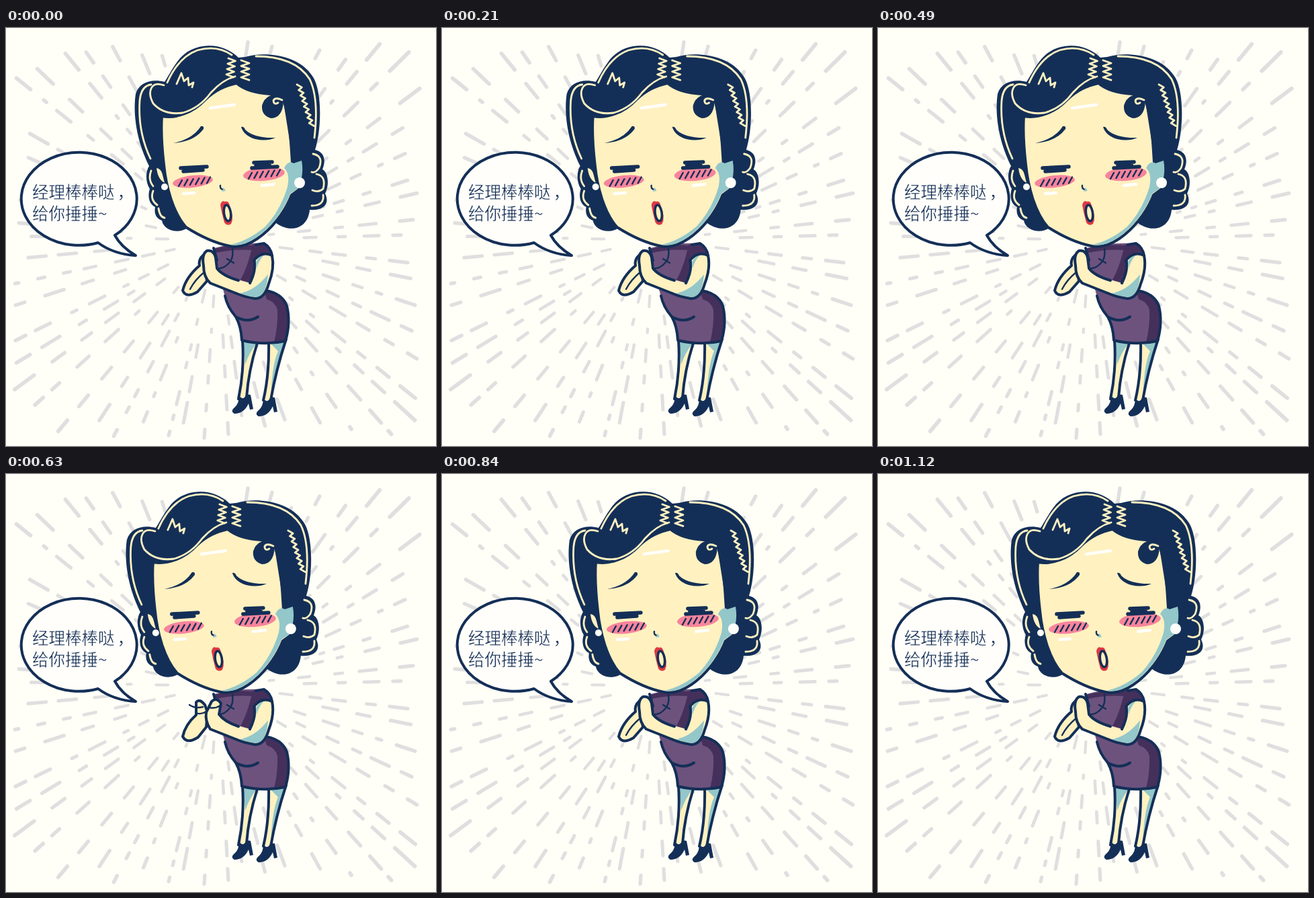
Write an HTML page that moves like this. It is 640 by 621 pixels and loops after 1.19 s.

```html
<!DOCTYPE html>
<html lang="zh">
<head>
<meta charset="utf-8">
<style>
html, body { margin: 0; width: 100%; height: 100%; overflow: hidden; background: #fffef7; }
svg { display: block; width: 640px; height: 621px; stroke-linecap: round; stroke-linejoin: round; }
.ink { fill: none; stroke: #142f57; stroke-width: 4; }
.thin { stroke-width: 2.4; }
.line { stroke: #142f57; stroke-width: 4; }
.navy { fill: #142f57; }
.skin { fill: #fff1c0; }
.shade { fill: #93c7ca; }
.dark { fill: #45305c; }
.light { fill: none; stroke: #fff1c0; stroke-width: 2.8; }
.white { fill: none; stroke: #fffefa; stroke-width: 4.5; }
text { font: 300 24.5px "Noto Sans CJK SC", "Noto Sans CJK", sans-serif; fill: #142f57; stroke: #fffefa; stroke-width: .4; }
</style>
</head>
<body>
<svg viewBox="0 0 640 621">
  <g id="rays" fill="none" stroke="#e0dfe0"></g>

  <path class="line" fill="#fffefa" d="M162 308A86 69 0 1 0 137 319Q160 336 193 338Q171 325 162 308Z"/>
  <text x="39" y="253">经理棒棒哒<tspan dx="4">，</tspan></text>
  <text x="39" y="285">给你捶捶~</text>

  <g id="legs">
    <path class="skin" d="M352 465Q355 505 347 549L358 549Q361 508 375 465ZM391 466Q393 510 383 553L394 553Q401 510 417 462Z"/>
    <path class="shade" d="M353 465L374 467Q362 482 356 500ZM392 467L416 464Q402 508 394 550Q396 500 405 480Z"/>
    <path class="ink" d="M352 464Q355 508 346 551M374 468Q361 508 358 549M391 467Q392 515 383 553M417 462Q402 507 394 553"/>
    <path id="shoe" class="navy" d="M347 546Q353 555 358 544L364 545L368 566L363 567L361 558Q354 573 340 573Q333 569 341 563Q347 557 347 546Z"/>
    <use href="#shoe" x="36" y="4"/>
  </g>
  <g id="dress">
    <path fill="#6d527e" d="M310 327Q340 318 384 320Q394 326 396 338L374 375L384 390Q411 394 418 413Q424 437 416 465Q385 472 351 464Q350 443 342 429Q329 414 326 398L320 378Z"/>
    <path class="dark" d="M367 322L386 320L396 338L363 379L349 374Q360 355 367 322ZM384 390Q411 394 418 413Q424 437 416 465L399 467Q405 443 404 419Q401 407 388 403ZM311 328Q338 320 368 323V330Q338 328 313 334Z"/>
    <path class="ink" d="M326 398Q329 414 342 429Q350 443 351 464Q385 472 416 465Q424 437 418 413Q411 394 386 390M342 429Q360 439 375 429M309 327L314 345M372 322L384 320Q394 326 396 338"/>
    <path class="ink thin" d="M337 328Q339 342 332 349Q324 358 315 357M329 343L339 349"/>
  </g>
  <g id="arm">
    <path class="skin" d="M372 343Q382 331 396 338Q400 357 391 380Q385 402 371 402Q356 400 342 394L325 378L345 374L364 379Q372 362 372 343Z"/>
    <path class="shade" d="M347 394Q370 391 390 366Q388 396 374 400Q359 399 347 394ZM372 348Q375 340 384 337Q375 347 373 358Z"/>
    <path class="ink" d="M371 343Q382 331 396 338Q400 357 391 380Q385 402 371 402Q356 400 342 394M369 345Q373 359 363 379"/>
  </g>
  <g id="closed">
    <path class="skin line" d="M294 337Q286 344 288 353Q268 370 263 390Q268 402 285 392L299 376Z"/>
    <path class="ink thin" d="M296 362Q281 374 274 388"/>
    <path class="skin line" d="M342 394L304 379Q294 370 294 353Q291 336 299 331Q309 329 312 341L314 357Q322 368 346 375"/>
  </g>
  <g id="open">
    <path class="skin line" d="M283 339Q288 333 296 343L300 354L298 376L286 391Q269 402 263 390Q267 372 283 358Z"/>
    <path class="skin line" d="M342 394L304 379Q296 367 298 354L306 338Q314 331 320 341L317 357Q325 368 346 375"/>
    <path class="ink thin" d="M273 343Q282 349 293 346M283 355Q290 358 298 353M303 347Q311 349 319 344"/>
  </g>
  <path class="skin" d="M336 377L352 379L352 394L336 388Z"/>

  <g id="head">
    <path class="navy" d="M346 44C320 18 275 21 255 50C246 62 241 73 236 80C218 75 198 80 193 98C189 125 193 165 213 205C207 215 208 230 214 239C210 252 214 262 222 266C220 276 224 283 232 286C235 302 258 306 270 297L400 288C418 304 449 302 452 270C471 272 483 262 475 246C482 232 479 214 471 210C477 195 473 184 460 181C470 150 471 90 455 70C435 40 385 34 356 43Z"/>
    <path class="skin line" d="M232 131C253 135 278 126 297 106C312 92 326 86 343 82C355 92 374 97 393 98L413 106C423 138 424 168 426 200L440 196Q446 218 436 240L425 248C415 274 395 299 374 313Q352 328 333 324C308 319 287 308 268 296C248 274 238 234 235 203Q230 160 232 131Z"/>
    <path class="shade" d="M414 208Q420 196 428 201L440 197Q444 219 435 238L423 246C413 272 394 297 373 311Q353 325 334 322Q361 316 386 295Q409 270 419 236Q423 216 414 208Z"/>
    <path class="navy" d="M392 101Q405 95 421 110L427 198L413 110Q411 134 394 134Q380 130 381 115Q384 105 392 101Z"/>
    <path class="light" d="M411 107Q400 102 398 108Q399 115 405 111"/>

    <g class="light">
      <path d="M235 85Q220 80 216 90Q212 99 219 112Q235 130 263 126Q288 119 305 96Q322 77 341 72M216 84Q201 86 199 108Q196 154 215 194M240 81Q257 43 285 33Q314 25 336 40M372 42Q430 42 452 76Q466 105 459 163"/>
      <path d="M457 187Q473 190 466 208Q460 216 455 214M462 217Q477 220 472 239Q465 245 456 241M472 248Q474 264 455 264M216 212Q211 225 219 235M219 242Q214 255 225 263M227 268Q229 281 236 282"/>
      <path id="shine"/>
    </g>
    <path class="skin" d="M224 208Q231 209 233 218L236 230Q226 225 224 208Z"/>
    <circle fill="#fffefa" cx="236" cy="236" r="5"/>
    <circle fill="#fffefa" cx="437" cy="230" r="8"/>

    <path class="navy" d="M249 171Q278 165 290 146Q295 145 294 150Q280 169 249 171ZM350 147Q354 146 356 151Q369 164 401 163Q388 169 371 165Q354 160 350 147Z"/>
    <g fill="#f7849c">
      <ellipse cx="278" cy="228" rx="30" ry="9" transform="rotate(-6 278 228)"/>
      <ellipse cx="384" cy="217" rx="31" ry="10" transform="rotate(-5 384 217)"/>
    </g>
    <path class="ink thin" id="blush"/>
    <path class="ink" style="stroke-width:5.5" d="M260 208L299 206M264 213L293 211M369 200L396 199M366 208L404 206M372 204L392 203"/>
    <path class="white" d="M304 119L340 114M264 246L280 245M381 234L399 232"/>
    <path class="ink thin" d="M319 234Q318 239 323 240"/>
    <path class="shade" d="M324 237L327 242L321 243Z"/>
    <path fill="#df3944" d="M319 263Q321 255 326 258Q331 256 333 264Q340 281 335 291Q329 295 325 289Q321 275 319 263Z"/>
    <ellipse class="skin line" style="stroke-width:3.5" cx="329.5" cy="275" rx="5" ry="12" transform="rotate(-8 329 275)"/>
  </g>
</svg>
<script>
const $ = id => document.getElementById(id);
const repeat = (n, f) => Array.from({ length: n }, (_, i) => f(i)).join("");
const CX = 315, CY = 315, RAYS = 58, STEP = 70, STEPS = 17;

let seed = 7;
const rand = (lo, hi) => lo + (hi - lo) * ((seed = seed * 16807 % 2147483647) / 2147483647);

// dashes running inwards along one ray, shorter and thinner near the middle
function ray(i) {
  const angle = (i + rand(-0.25, 0.25)) / RAYS * 2 * Math.PI;
  const cos = Math.cos(angle), sin = Math.sin(angle);
  const at = r => `${CX + r * cos} ${CY + r * sin}`;
  const inner = i % 2 ? 75 : 140;
  let r = Math.min(305 / Math.abs(cos), 295 / Math.abs(sin), 400) - rand(0, 35);
  let out = "";
  while (r > inner) {
    const len = rand(4, 12 + r / 14);
    out += `<path stroke-width="${3.5 + r / 170}" d="M${at(r)}L${at(r - len)}"/>`;
    r -= len + rand(16, 38);
  }
  return out;
}
$("rays").innerHTML = repeat(RAYS, ray);

const zigzag = (x, y, n, dx, dy, wide) => `M${x} ${y}` +
  repeat(n, i => `l${dx + (i % 2 ? -wide : wide)} ${dy}`);
$("shine").setAttribute("d",
  zigzag(331, 45, 7, -0.5, 4, 11) + zigzag(350, 48, 7, 0, 4.2, 12) +
  zigzag(433, 84, 15, 1.3, 4.1, 6) + "M254 83L261 67L265 79L271 74L272 85L279 81L277 88");

const hatch = (x, y) => repeat(6, i => `M${x + i * 8.4} ${y - i * 0.9}l5 -9`);
$("blush").setAttribute("d", hatch(257, 235) + hatch(361, 224));

// eases left for half the loop, then swings right and rests
function sway(step) {
  const t = step / 8;
  return t <= 1 ? -16.5 * t * (1.3 - 0.3 * t) : Math.min(6, -16.5 + 3.35 * (step - 8));
}

function draw(time) {
  const step = Math.floor(time / STEP) % STEPS;
  const apart = step % 4 === 1 || step % 4 === 2;
  $("head").setAttribute("transform", `translate(${sway(step)} 0)`);
  $("open").setAttribute("visibility", apart ? "visible" : "hidden");
  $("closed").setAttribute("visibility", apart ? "hidden" : "visible");
}

const start = performance.now();
function tick() {
  draw(performance.now() - start);
  requestAnimationFrame(tick);
}
tick();
</script>
</body>
</html>
```
